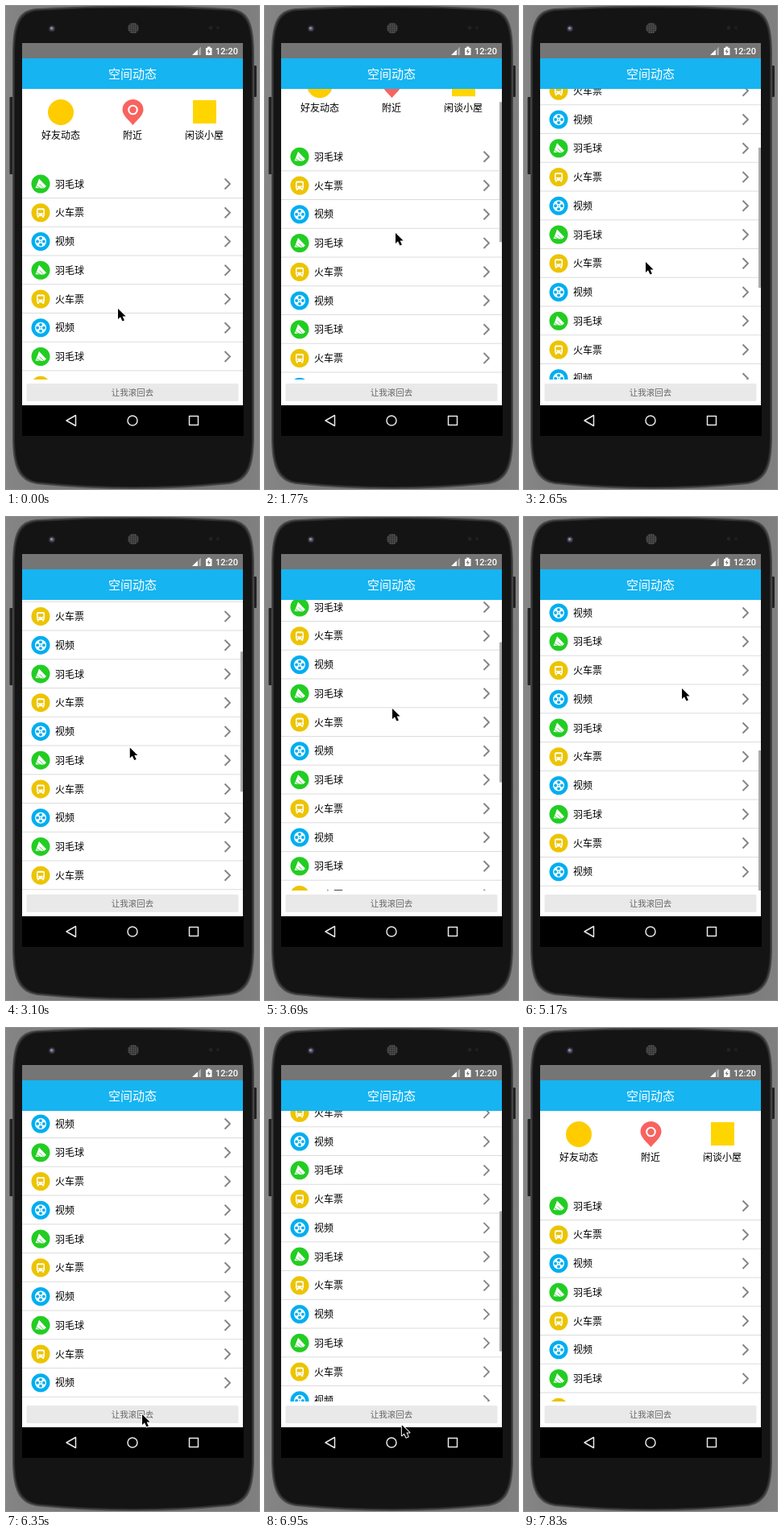
Animation, 314 px wide and 600 px high, one loop 8850 ms. Source, as an HTML page with a canvas:

```html
<!DOCTYPE html>
<html lang="zh">
<head>
<meta charset="utf-8">
<style>
html, body { margin: 0; width: 100%; height: 100%; overflow: hidden; background: #7c7c7c; }
canvas { display: block; }
</style>
</head>
<body>
<canvas id="stage" width="314" height="600"></canvas>
<script>
const ctx = document.getElementById('stage').getContext('2d');
const LOOP = 8850, ROW = 35.75, ROWS = 18, MAX_SCROLL = 388, THUMB = 174;
const VIEW = { x: 20, y: 103, w: 274, h: 361 };
const CJK = '"Noto Sans CJK SC", "Noto Sans CJK", sans-serif';
const ICON_WHITE = '#fff', NAV = '#e8e8e8';

const clamp = (v, lo, hi) => Math.max(lo, Math.min(hi, v));
const linear = f => f;
const smooth = f => f * f * (3 - 2 * f);

const tickAt = t => t < 6800
  ? clamp(1 + Math.floor((t - 436) / 147.5), 0, 41)
  : clamp(42 + Math.floor((t - 6800) / 147), 42, 49);

// Each stop is [tick, value...].
function tween(stops, tick, ease) {
  const i = stops.findIndex(s => s[0] > tick);
  if (i < 1) return stops.at(i).slice(1);
  const a = stops[i - 1], b = stops[i];
  const f = ease((tick - a[0]) / (b[0] - a[0]));
  return a.slice(1).map((v, k) => v + (b[k + 1] - v) * f);
}

const scrollStops = [[8.28, 0], [16, 151.5], [23, 109], [32, MAX_SCROLL], [41, MAX_SCROLL], [47, 0]];
const cursorStops = [[0, 138, 375], [7, 152, 286], [10, 161, 281], [16, 150, 317], [23, 157, 237],
  [26, 168, 465], [33, 195, 212], [40, 168, 479], [42, 168, 479], [47, 176, 606]];

// Shown from one tick to another, then faded out over three ticks.
const pulse = (tick, from, to) => tick < from ? 0 : clamp(1 - (tick - to) / 3, 0, 1);

function shape(path, fill, stroke, width = 1) {
  const p = typeof path === 'string' ? new Path2D(path) : path;
  if (stroke) {
    ctx.strokeStyle = stroke;
    ctx.lineWidth = width;
    ctx.stroke(p);
  }
  if (fill) {
    ctx.fillStyle = fill;
    ctx.fill(p);
  }
}

function circle(x, y, r) {
  const p = new Path2D();
  p.arc(x, y, r, 0, Math.PI * 2);
  return p;
}

const disc = (x, y, r, color) => shape(circle(x, y, r), color);
const ring = (x, y, r, color, width) => shape(circle(x, y, r), null, color, width);

function rect(x, y, w, h, color, radius = 0) {
  const p = new Path2D();
  p.roundRect(x, y, w, h, radius);
  shape(p, color);
}

function text(str, x, y, size, color, align = 'center', weight = 400, font = CJK) {
  ctx.font = `${weight} ${size}px ${font}`;
  ctx.textAlign = align;
  ctx.fillStyle = color;
  ctx.fillText(str, x, y + size * 0.38);
}

function at(x, y, paint) {
  ctx.save();
  ctx.translate(x, y);
  paint();
  ctx.restore();
}

const kinds = [
  { label: '羽毛球', color: '#22cd22', icon(color) {
    shape('M-2-6.5 L7 3 L4 5.5 L-6.5 5 L-4-1Z', ICON_WHITE);
    shape('M-1.5 0 L4 5.5 M-5.5 2.5 L0 5.5', null, color, 0.8);
  } },
  { label: '火车票', color: '#ecc400', icon(color) {
    rect(-5, -5.5, 10, 10, ICON_WHITE, 2);
    rect(-3.5, -3.5, 7, 4, color, 0.5);
    for (const side of [-1, 1]) {
      disc(side * 2.8, 2.4, 0.8, color);
      rect(side * 3.2 - 1, 4, 2, 2, ICON_WHITE);
    }
  } },
  { label: '视频', color: '#00aeef', icon(color) {
    disc(0, 0, 7, ICON_WHITE);
    for (let a = 0; a < 4; a++) {
      const angle = a * Math.PI / 2;
      disc(3.9 * Math.cos(angle), 3.9 * Math.sin(angle), 1.9, color);
    }
    disc(0, 0, 0.8, color);
  } }
];

// Phone outline with bowed ends, shrunk by the given inset.
function body(inset, color) {
  at(158, 298, () => {
    ctx.scale(1 - inset / 150, 1 - inset / 300);
    shape('M-150-238 C-150-280-142-293-120-295 Q0-302 120-295 C142-293 150-280 150-238' +
      'V237 C150 277 142 292 120 296 Q0 308-120 296 C-142 292-150 277-150 237Z', color);
  });
}

function drawPhone() {
  const backdrop = ctx.createLinearGradient(0, 0, 314, 0);
  backdrop.addColorStop(0, '#858585');
  backdrop.addColorStop(0.5, '#6c6c6c');
  backdrop.addColorStop(1, '#808080');
  rect(0, 0, 314, 600, backdrop);
  rect(4.5, 113, 4, 96, '#222', 1);
  rect(307, 74, 4, 39, '#222', 1);
  body(0, '#4a4a4a');
  body(1.5, '#2a2a2a');
  body(3, '#141414');

  disc(57, 28, 4.5, '#252528');
  disc(57, 28, 2.8, '#555870');
  disc(56.5, 27.5, 1.2, '#a0a4c0');
  disc(158, 27.5, 7, '#303030');
  for (let y = -5; y <= 5; y += 2.5)
    for (let x = -5; x <= 5; x += 2.5)
      if (Math.hypot(x, y) < 6) disc(158 + x, 27.5 + y, 0.75, '#707070');
  disc(254, 27, 2.5, '#222');
  disc(263, 27, 2, '#202020');
}

function drawHeader() {
  disc(68, 132, 16, '#ffcc00');
  shape('M157.5 148 C153 142 144.5 136 144.5 129 A13 13 0 0 1 170.5 129 C170.5 136 162 142 157.5 148Z', '#f8635f');
  ring(157.5, 129, 5.3, '#fff', 2);
  rect(232, 117, 29, 29, '#ffd500');
  ['好友动态', '附近', '闲谈小屋'].forEach((label, i) =>
    text(label, 68 + i * 89, 160.5, 12, '#000', 'center', 500));
}

function drawRow(kind) {
  disc(43, 0, 11.5, kind.color);
  at(43, 0, () => kind.icon(kind.color));
  text(kind.label, 61, 0, 12, '#000', 'left', 500);
  shape('M271.5-6.5 L278 0 L271.5 6.5', null, '#858585', 1.9);
  rect(20, 17, 274, 1, '#dcdcdc');
}

function drawList(scroll, barAlpha) {
  ctx.save();
  ctx.beginPath();
  ctx.rect(VIEW.x, VIEW.y, VIEW.w, VIEW.h);
  ctx.clip();
  at(0, -scroll, () => {
    drawHeader();
    for (let i = 0; i < ROWS; i++) at(0, 221 + i * ROW, () => drawRow(kinds[i % 3]));
  });
  ctx.globalAlpha = barAlpha;
  rect(291, VIEW.y + scroll / MAX_SCROLL * (VIEW.h - THUMB), 3, THUMB, '#aaa');
  ctx.restore();
}

function drawBars() {
  rect(20, 46, 274, 19, '#757575');
  shape('M231 61 L238 54.3 V61Z', '#fff');
  shape('M239 53.4 L242 50.5 V61 H239Z', '#a9a9a9');
  shape('M248 52 H250 V50.5 H253.5 V52 H255.5 V61 H248Z', '#fff');
  shape('M252.3 53 L249.7 57 H251.5 L251 60 L253.9 56 H252Z', '#757575');
  text('12:20', 288, 56, 11, '#fff', 'right', 500, 'Roboto, sans-serif');
  rect(20, 65, 274, 38, '#16b4f1');
  text('空间动态', 157, 84.3, 15, '#fff');

  rect(25.5, 469, 263, 22, '#e9e9e9', 1.5);
  text('让我滚回去', 157, 480, 10.5, '#666');

  rect(20, 496, 275, 38, '#000');
  ctx.lineJoin = 'round';
  shape('M75 515 L86.5 508.5 V521.5Z', null, NAV, 1.5);
  ring(157, 515, 6, NAV, 1.5);
  shape('M227.5 509.5 H238.5 V520.5 H227.5Z', null, NAV, 1.5);
}

function drawCursor(x, y) {
  at(x, y, () => shape('M1 1 V14 L4 11.2 L6.5 16.5 L8.9 15.4 L6.6 10.4 H10.6Z', '#000', '#fff', 2));
}

function render(time) {
  const tick = tickAt(time % LOOP);
  const [scroll] = tween(scrollStops, tick, linear);
  drawPhone();
  rect(20, 46, 274, 451, '#fff');
  drawList(scroll, pulse(tick, 9, 33) + pulse(tick, 42, 46));
  drawBars();
  drawCursor(...tween(cursorStops, tick, smooth));
}

const start = performance.now();
function loop() {
  render(performance.now() - start);
  requestAnimationFrame(loop);
}
loop();
</script>
</body>
</html>
```
